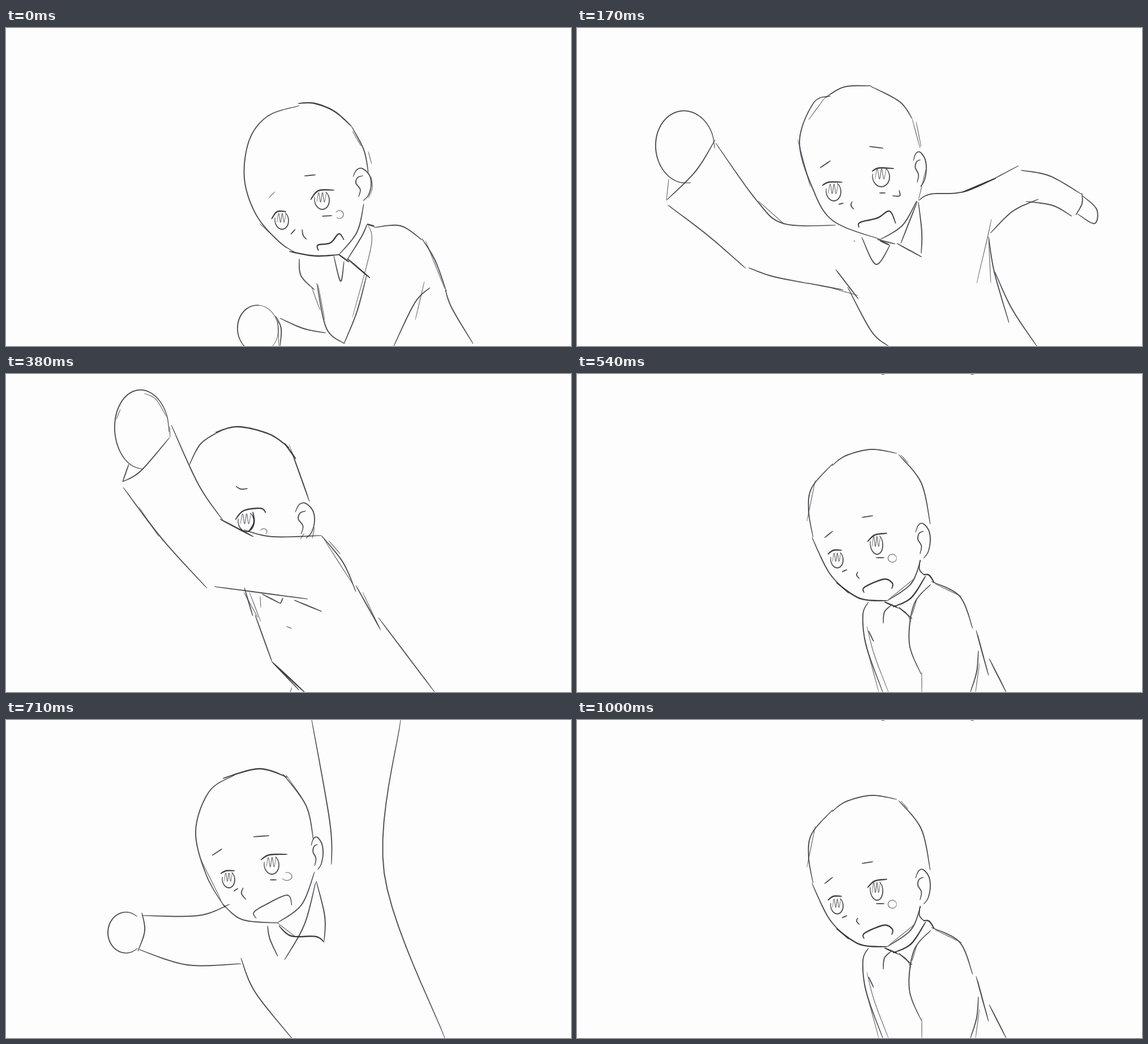
These frames come from a looping animation (998 px wide and 561 px high, 1040 ms). An HTML page with a canvas:

```html
<!DOCTYPE html>
<html lang="en">
<head>
<meta charset="utf-8">
<title>Pencil throw</title>
<style>
html, body { margin: 0; width: 100%; height: 100%; overflow: hidden; background: #fdfdfd; }
canvas { display: block; }
</style>
</head>
<body>
<canvas id="stage" width="998" height="561"></canvas>
<script>
const LOOP = 1040;
const ctx = document.getElementById("stage").getContext("2d");

// Catmull-Rom value between b and c
const spline = (a, b, c, d, t) =>
  b + t / 2 * (c - a + t * (2 * a - 5 * b + 4 * c - d + t * (3 * (b - c) + d - a)));

function smooth(pts) {
  const at = i => pts[Math.max(0, Math.min(pts.length - 1, i))];
  const line = [pts[0]];
  for (let i = 0; i < pts.length - 1; i++) {
    for (let k = 1; k <= 10; k++) {
      line.push([0, 1].map(n => spline(at(i - 1)[n], at(i)[n], at(i + 1)[n], at(i + 2)[n], k / 10)));
    }
  }
  return line;
}

// Pencil line as one filled outline, thinner towards both ends
function pencil(width, color, pts) {
  const line = smooth(pts);
  const last = line.length - 1;
  const left = [], right = [];
  line.forEach(([x, y], i) => {
    const [x0, y0] = line[Math.max(0, i - 1)];
    const [x1, y1] = line[Math.min(last, i + 1)];
    const len = Math.hypot(x1 - x0, y1 - y0) || 1;
    const half = width / 2 * (0.45 + 0.55 * Math.sqrt(Math.abs(Math.sin(Math.PI * i / last))));
    const nx = (y0 - y1) / len * half, ny = (x1 - x0) / len * half;
    left.push([x + nx, y + ny]);
    right.unshift([x - nx, y - ny]);
  });
  ctx.beginPath();
  left.concat(right).forEach(p => ctx.lineTo(...p));
  ctx.closePath();
  ctx.fillStyle = color;
  ctx.fill();
}

const pairs = n => n.filter((_, i) => i % 2 === 0).map((x, i) => [x, n[2 * i + 1]]);
const bold = (...n) => pencil(2.5, "rgba(38,38,42,.88)", pairs(n));
const ink = (...n) => pencil(2, "rgba(45,45,50,.82)", pairs(n));
const faint = (...n) => pencil(1.4, "rgba(60,60,65,.68)", pairs(n));

// Part of an ellipse, from angle a to angle b
function ring(pen, cx, cy, rx, ry, a, b, turn = 0) {
  const pts = [];
  for (let i = 0; i <= 12; i++) {
    const t = a + (b - a) * i / 12;
    const x = rx * Math.cos(t), y = ry * Math.sin(t);
    pts.push(cx + x * Math.cos(turn) - y * Math.sin(turn), cy + x * Math.sin(turn) + y * Math.cos(turn));
  }
  pen(...pts);
}

function eye(cx, cy, rx, ry, ...lid) {
  bold(...lid);
  ring(ink, cx, cy, rx, ry, 3.5, -0.9, -0.1);
  const hatch = [];
  for (let i = 0; i < 6; i++) {
    hatch.push(cx + rx * (i * 0.26 - 0.7), cy + ry * (i % 2 ? -0.75 : 0.25));
  }
  faint(...hatch);
}

function ear(x, y, w, h) {
  const place = (...n) => n.map((v, i) => i % 2 ? y + v * h : x + v * w);
  ink(...place(0, .25, .2, .04, .52, 0, .9, .2, 1, .5, .85, .82, .55, 1));
  ink(...place(.55, .22, .25, .28, .16, .45, .4, .65, .3, .88));
}

function down() {
  ink(518, 137, 463, 155, 430, 197, 421, 265, 441, 328, 480, 375, 512, 397);
  bold(516, 133, 545, 133, 580, 147, 610, 173);
  ink(610, 173, 632, 215, 640, 255);
  faint(612, 182, 627, 208);
  faint(640, 218, 646, 240);
  faint(448, 345, 495, 388);
  bold(500, 394, 545, 402, 588, 400);
  ink(588, 400, 620, 360, 632, 310);
  ear(613, 248, 32, 57);
  faint(645, 262, 647, 282, 640, 300);

  ink(527, 261, 547, 259);
  faint(464, 300, 475, 289);
  eye(558, 303, 13, 17, 538, 303, 552, 287, 580, 286);
  eye(487, 339, 12, 16, 469, 337, 479, 324, 495, 324);
  ink(558, 332, 576, 331);
  ink(503, 364, 511, 355);
  ring(faint, 589, 329, 7, 7, -2.7, 2.4);
  ink(523, 355, 525, 366, 531, 373);
  bold(552, 393, 551, 383, 573, 379, 588, 363, 597, 374);

  ink(579, 402, 591, 447, 597, 412);
  bold(587, 399, 606, 413);
  bold(603, 407, 643, 441);
  ink(638, 346, 628, 368, 602, 410);
  bold(638, 346, 651, 350);
  faint(640, 348, 645, 385, 612, 510);
  ink(637, 436, 620, 500, 597, 557);
  ink(650, 352, 697, 349, 735, 374);
  ink(735, 372, 758, 410, 778, 465);
  faint(741, 375, 775, 460);
  ink(776, 462, 788, 495, 825, 557);
  ink(749, 458, 722, 485, 685, 561);
  faint(739, 447, 723, 515);
  ink(518, 407, 521, 437, 545, 462);
  faint(540, 458, 555, 498);
  ink(549, 450, 566, 530, 598, 557);
  faint(551, 452, 563, 515);

  ink(484, 512, 525, 530, 565, 538);
  ring(ink, 445, 531, 36, 42, -1.4, -3.9, -0.1);
  ring(faint, 445, 531, 36, 42, -1.7, 0.9, -0.1);
  ink(476, 508, 486, 530, 484, 561);
  faint(480, 516, 482, 561);
}

function crouch() {
  ink(450, 162, 475, 144, 520, 133, 565, 140);
  ink(568, 142, 608, 192, 624, 265);
  faint(572, 143, 585, 157);
  ink(452, 158, 415, 200, 409, 240, 417, 288);
  faint(421, 187, 406, 260);
  ink(415, 288, 445, 350, 480, 387);
  bold(458, 368, 500, 396, 548, 400);
  ink(548, 400, 590, 370, 607, 328);
  faint(550, 398, 597, 360);
  ear(598, 264, 26, 61);

  ink(503, 253, 523, 250);
  ink(437, 289, 452, 277);
  eye(529, 300, 11, 18, 513, 296, 526, 284, 548, 281);
  eye(459, 327, 11, 15, 443, 318, 453, 311, 468, 311);
  ink(528, 324, 543, 324);
  ink(468, 349, 477, 345);
  ring(faint, 557, 325, 7.5, 7, 0, 6.2);
  ink(496, 349, 494, 355, 499, 361);
  bold(507, 386, 508, 376, 542, 362, 557, 369, 556, 379);

  ink(606, 328, 605, 345, 614, 355);
  bold(616, 356, 590, 395, 558, 411);
  bold(543, 402, 566, 412);
  ink(555, 408, 543, 420, 541, 440);
  ink(568, 411, 592, 432);
  faint(562, 411, 580, 420, 590, 437);
  bold(612, 354, 622, 355, 631, 368);
  ink(625, 371, 595, 407, 587, 475, 608, 530);
  faint(609, 526, 609, 561);
  faint(600, 398, 592, 425);
  ink(626, 366, 676, 392, 699, 449);
  faint(632, 370, 680, 393);
  ink(705, 452, 727, 532);
  faint(708, 460, 718, 500);
  ink(709, 488, 706, 525, 695, 561);
  faint(711, 510, 704, 561);
  ink(728, 502, 758, 561);
  faint(537, 0, 543, 1);
  faint(695, 0, 701, 1);

  ink(515, 402, 505, 425, 511, 480, 540, 561);
  faint(512, 445, 525, 495, 550, 561);
  faint(507, 465, 533, 561);
  ink(515, 453, 524, 472);
}

function reach() {
  ink(437, 124, 472, 104, 520, 102);
  ink(519, 103, 570, 130, 592, 160);
  faint(592, 160, 606, 212);
  faint(599, 165, 608, 210);
  ink(448, 120, 418, 132, 393, 200, 415, 280, 452, 340, 536, 373);
  faint(437, 124, 409, 162);
  faint(390, 197, 412, 280);
  ink(536, 373, 575, 348, 600, 305);
  ear(594, 219, 23, 61);
  faint(616, 250, 603, 304);

  ink(516, 209, 541, 212);
  ink(429, 247, 448, 234);
  eye(537, 262, 15, 18, 521, 253, 533, 247, 560, 248);
  eye(453, 288, 13, 17, 433, 278, 445, 272, 469, 272);
  ink(534, 291, 545, 291);
  ink(462, 311, 471, 309);
  ink(557, 296, 570, 296, 569, 286);
  ink(486, 306, 484, 313, 489, 320);
  bold(498, 352, 500, 343, 531, 335, 552, 323, 563, 345);

  ink(503, 369, 528, 417, 553, 383);
  ink(530, 373, 562, 381);
  bold(535, 375, 552, 383);
  ink(565, 380, 609, 404);
  ink(572, 380, 601, 306);
  ink(603, 307, 609, 360, 608, 398);
  ink(604, 304, 625, 293, 690, 287, 780, 243);
  bold(680, 290, 740, 265);
  faint(732, 337, 725, 370, 706, 450);
  ink(727, 368, 737, 430, 763, 520);
  faint(727, 372, 731, 450);
  ink(738, 430, 768, 495, 812, 561);
  ink(457, 426, 497, 478);
  ink(478, 457, 520, 535, 550, 561);
  faint(489, 375, 491, 377);

  ink(784, 251, 835, 261, 891, 293);
  ink(892, 291, 892, 310, 881, 330);
  ink(730, 362, 770, 323, 815, 302);
  ink(793, 306, 840, 313, 874, 332);
  ink(893, 296, 918, 320, 914, 345, 884, 328);
  ink(245, 203, 318, 305, 365, 345, 457, 348);
  faint(320, 305, 365, 345);
  ink(160, 312, 230, 365, 298, 424);
  ink(303, 423, 345, 438, 410, 451);
  ink(407, 450, 470, 462);
  faint(450, 459, 497, 472);
  ink(244, 197, 210, 252, 158, 304);
  faint(158, 304, 162, 266);
  ring(ink, 191, 210, 52, 64, 1.5, 6.4, -0.1);
}

function stretchHead() {
  ink(412, 91, 367, 120, 343, 190, 362, 268, 395, 325);
  ink(390, 318, 425, 346, 487, 352);
  bold(391, 97, 455, 80, 505, 95);
  ink(497, 89, 538, 145, 551, 205);
  faint(502, 90, 530, 130);
  faint(352, 240, 388, 312);
  ink(487, 352, 530, 320, 553, 262);
  ear(547, 201, 21, 57);

  ink(445, 200, 473, 198);
  ink(372, 233, 390, 221);
  eye(477, 249, 13, 17, 458, 241, 473, 232, 505, 231);
  eye(401, 275, 11, 15, 387, 265, 397, 260, 412, 260);
  ink(474, 276, 486, 276);
  ink(410, 296, 418, 291);
  ring(faint, 504, 270, 9, 7, 2.7, -1.9);
  ink(427, 290, 424, 300, 432, 311);
  ink(450, 344, 446, 333, 470, 318, 505, 303, 513, 321);

  ink(470, 357, 474, 380, 488, 411);
  faint(485, 350, 520, 377);
  bold(490, 357, 512, 375, 555, 376, 570, 386);
  ink(500, 417, 535, 355, 555, 280);
  ink(556, 278, 571, 340, 570, 384);
}

function stretch() {
  stretchHead();
  faint(558, 280, 590, 253, 655, 238);
  ink(587, 250, 625, 248, 722, 183);
  faint(676, 309, 664, 427);
  ink(671, 345, 719, 492);
  faint(703, 432, 760, 532);
  ink(709, 438, 788, 561);
  ink(406, 396, 447, 490);
  ink(437, 473, 460, 510, 511, 561);
  faint(428, 436, 440, 470);

  ink(722, 183, 800, 192, 887, 235);
  ink(888, 234, 887, 265, 880, 291);
  faint(877, 290, 888, 278);
  ink(677, 333, 700, 300, 745, 250);
  faint(680, 320, 735, 258);
  ink(742, 250, 815, 251, 880, 290);
  faint(755, 209, 754, 245);
  ring(ink, 903, 270, 24, 25, -2.1, 2.2);
  ink(131, 222, 195, 322, 275, 403);
  ink(275, 403, 320, 423, 388, 441);
  faint(387, 443, 436, 465);
  faint(390, 443, 430, 457);
  ink(218, 150, 265, 255, 320, 303);
  faint(270, 262, 290, 280);
  ink(318, 303, 360, 325, 396, 322);
  ink(215, 131, 203, 186);
  ink(208, 178, 165, 221, 120, 232);
  faint(125, 222, 133, 233);
  faint(215, 135, 218, 160);
  ring(faint, 152, 143, 54, 68, -0.35, -5.4);
  faint(108, 180, 126, 208);
}

function overhead() {
  ctx.save();
  ctx.translate(-8, 6);
  stretchHead();
  ctx.restore();
  ink(575, 255, 572, 180, 540, 0);
  ink(697, 0, 668, 270, 775, 561);
  ink(415, 420, 440, 480, 507, 564);
  ink(395, 325, 340, 345, 240, 345);
  ink(415, 430, 320, 432, 235, 405);
  ink(240, 340, 245, 372, 233, 408);
  ring(ink, 212, 375, 32, 36, -0.9, -5.4);
}

function cross() {
  ink(324, 160, 345, 122, 385, 97);
  bold(370, 103, 410, 93, 465, 106, 500, 130);
  bold(492, 122, 512, 150);
  ink(505, 138, 536, 225);
  faint(500, 124, 533, 215);
  ear(511, 228, 34, 62);
  faint(545, 270, 541, 290);
  faint(527, 281, 520, 291);

  ink(406, 198, 415, 203, 427, 202);
  eye(424, 260, 14, 18, 405, 257, 420, 241, 450, 237, 459, 245);
  bold(428, 279, 438, 262, 436, 243);
  ring(faint, 455, 278, 6, 5, -2.8, 0.9);

  ink(557, 285, 595, 332, 618, 384);
  faint(562, 292, 612, 370);
  faint(570, 294, 591, 318);
  ink(618, 373, 661, 450);
  faint(630, 385, 662, 453);
  ink(658, 430, 757, 561);
  ink(421, 377, 436, 427);
  faint(430, 385, 450, 437);
  faint(420, 385, 445, 430);
  ink(440, 425, 470, 508);
  bold(470, 508, 527, 561);
  ink(472, 510, 518, 558);
  faint(505, 553, 502, 561);
  ink(452, 388, 485, 405);
  ink(485, 405, 489, 395);
  faint(449, 392, 450, 412);
  faint(495, 445, 505, 449);

  ink(292, 90, 340, 195, 383, 258);
  bold(378, 256, 437, 287);
  ink(420, 275, 470, 287, 557, 285);
  ink(207, 200, 275, 290, 355, 378);
  faint(235, 235, 270, 287);
  ink(368, 375, 533, 397);
  ink(509, 399, 558, 419);
  ink(289, 112, 238, 171, 206, 190);
  ink(206, 190, 217, 159);
  ring(ink, 240, 98, 48, 70, 1.65, 6.4, -0.07);
  faint(244, 34, 265, 45, 283, 75);
  faint(202, 62, 195, 80);
  faint(289, 92, 290, 112);
}

const timeline = [
  [0, down], [40, crouch], [130, reach], [210, stretch], [250, overhead], [340, cross],
  [420, down], [500, crouch], [580, reach], [630, stretch], [710, overhead], [790, cross],
  [880, down], [960, crouch]
];
let shown = null;
const start = performance.now();

function tick() {
  const time = (performance.now() - start) % LOOP;
  const pose = timeline.filter(step => step[0] <= time).pop()[1];
  if (pose !== shown) {
    ctx.fillStyle = "#fdfdfd";
    ctx.fillRect(0, 0, 998, 561);
    pose();
    shown = pose;
  }
  requestAnimationFrame(tick);
}
tick();
</script>
</body>
</html>
```
